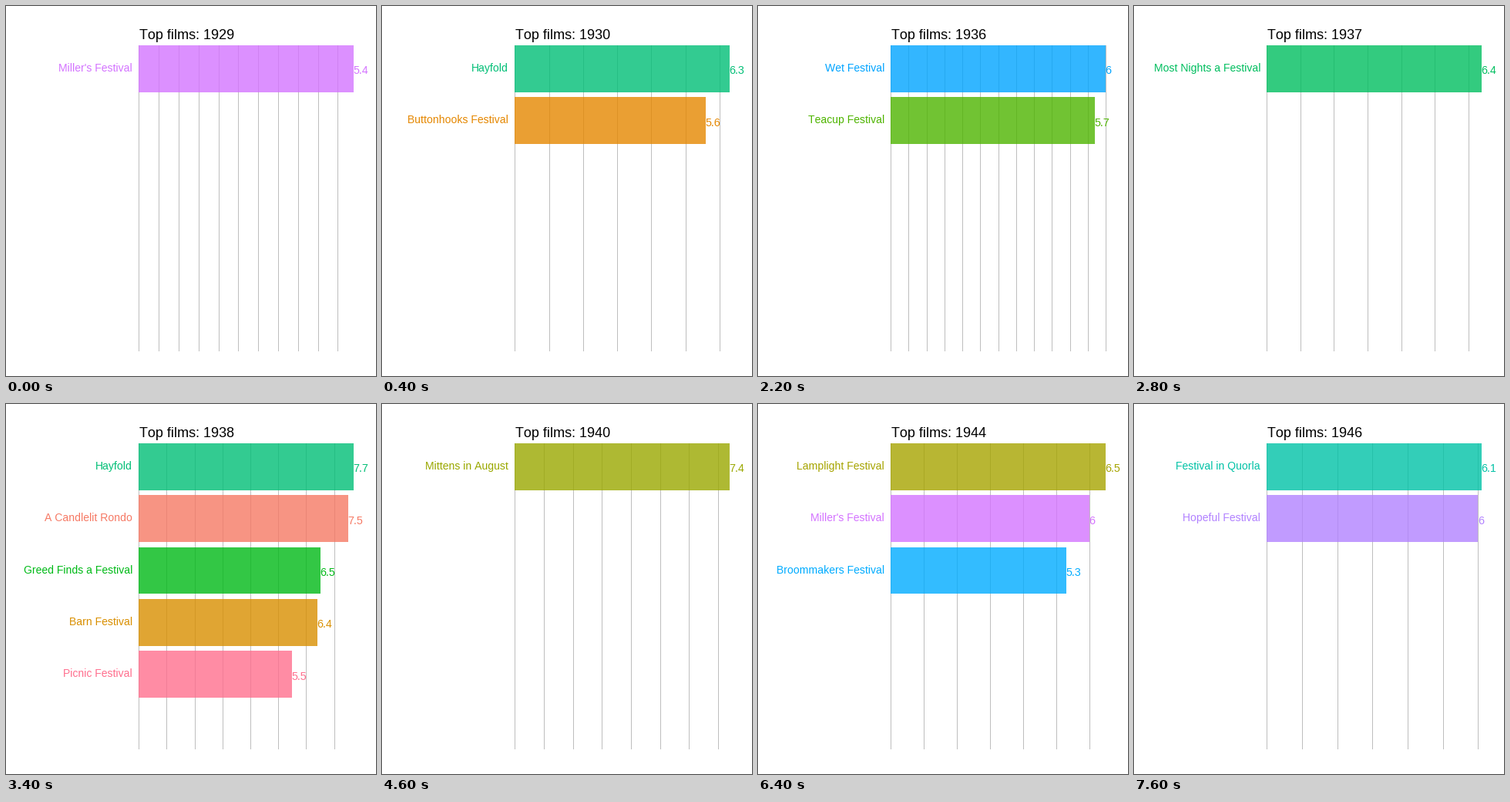
Write a matplotlib script that moves like this. It is 480 px wide and 480 px high and loops after 8000 ms.

```python
import numpy as np
import matplotlib.pyplot as plt
from matplotlib.animation import FuncAnimation
from matplotlib.patches import Rectangle

plt.rcParams["font.family"] = "Liberation Sans"
plt.rcParams["text.kerning_factor"] = 6    # no pair kerning

SIZE, DPI = 480, 96
PT = 72 / DPI                  # points per pixel
LEFT, WIDTH = 172.25, 278.8    # bar origin and length of the longest bar
TOP, BOTTOM = 51, 448
PITCH, BAR = 67.3, 60.6
STEP_MS = 200

COLORS = {
    "Miller's Festival": "#d474ff",
    "Hayfold": "#00bf76",
    "Buttonhooks Festival": "#e58700",
    "Grandpa's Festival": "#00b6ec",
    "Sorrow Buys a Festival": "#00bd32",
    "Wet Festival": "#00a4ff",
    "Teacup Festival": "#4eb400",
    "Most Nights a Festival": "#00be5f",
    "A Candlelit Rondo": "#f67964",
    "Greed Finds a Festival": "#00ba17",
    "Barn Festival": "#d98f00",
    "Picnic Festival": "#ff6f8e",
    "Basketmaker Festival": "#e7861b",
    "Mittens in August": "#9aa800",
    "Careful Festival": "#00bcd6",
    "Teacup Inn": "#00c196",
    "Lamplight Festival": "#a6a400",
    "Broommakers Festival": "#00acff",
    "Lamplight in Thornwicket": "#a0a600",
    "Festival in Quorla": "#00c2a6",
    "Hopeful Festival": "#b282ff",
}

CHARTS = [
    (1929, [("Miller's Festival", 5.4)]),
    (1930, [("Hayfold", 6.3), ("Buttonhooks Festival", 5.6)]),
    (1931, [("Grandpa's Festival", 6.4)]),
    (1934, [("Sorrow Buys a Festival", 6.9)]),
    (1936, [("Wet Festival", 6), ("Teacup Festival", 5.7)]),
    (1937, [("Most Nights a Festival", 6.4)]),
    (1938, [("Hayfold", 7.7), ("A Candlelit Rondo", 7.5),
            ("Greed Finds a Festival", 6.5), ("Barn Festival", 6.4),
            ("Picnic Festival", 5.5)]),
    (1939, [("Basketmaker Festival", 6.1)]),
    (1940, [("Mittens in August", 7.4)]),
    (1941, [("Careful Festival", 6.1)]),
    (1942, [("Teacup Inn", 7.4)]),
    (1944, [("Lamplight Festival", 6.5), ("Miller's Festival", 6),
            ("Broommakers Festival", 5.3)]),
    (1945, [("Lamplight in Thornwicket", 7.3)]),
    (1946, [("Festival in Quorla", 6.1), ("Hopeful Festival", 6)]),
]

fig = plt.figure(figsize=(SIZE / DPI, SIZE / DPI), dpi=DPI, facecolor="white")
ax = fig.add_axes([0, 0, 1, 1])


def write(x, y, text, px, color, ha="left"):
    ax.text(x, y, text, fontsize=px * PT, color=color, ha=ha, va="baseline")


def box(x, y, w, h, color, alpha=1, z=1):
    ax.add_patch(Rectangle((x, y), w, h, facecolor=color, alpha=alpha,
                           linewidth=0, zorder=z))


def draw_grid(top_value, scale):
    step = 0.5 if top_value <= 6 else 1
    for tick in np.arange(0, top_value + 1e-6, step):
        box(LEFT + tick * scale, TOP, 1, BOTTOM - TOP, "#bebebe")


def draw_bar(row, title, value, scale):
    y = TOP + row * PITCH
    color = COLORS[title]
    length = value * scale
    box(LEFT, y, length, BAR, color, alpha=0.8, z=2)
    write(164, y + 34, title, 14, color, ha="right")
    write(LEFT + length - 0.6, y + 37.3, f"{value:g}", 14.2, color)


def draw(i):
    # The first chart is held for two steps, the others for three.
    year, films = CHARTS[(i + 1) // 3]
    ax.clear()
    ax.set(xlim=(0, SIZE), ylim=(SIZE, 0))
    ax.axis("off")
    top_value = films[0][1]
    scale = WIDTH / top_value
    draw_grid(top_value, scale)
    for row, (title, value) in enumerate(films):
        draw_bar(row, title, value, scale)
    write(173, 43, f"Top films: {year}", 18, "black")
    return []


anim = FuncAnimation(fig, draw, frames=40, interval=STEP_MS,
                     init_func=lambda: [], repeat=True, repeat_delay=0)
plt.show()
```
